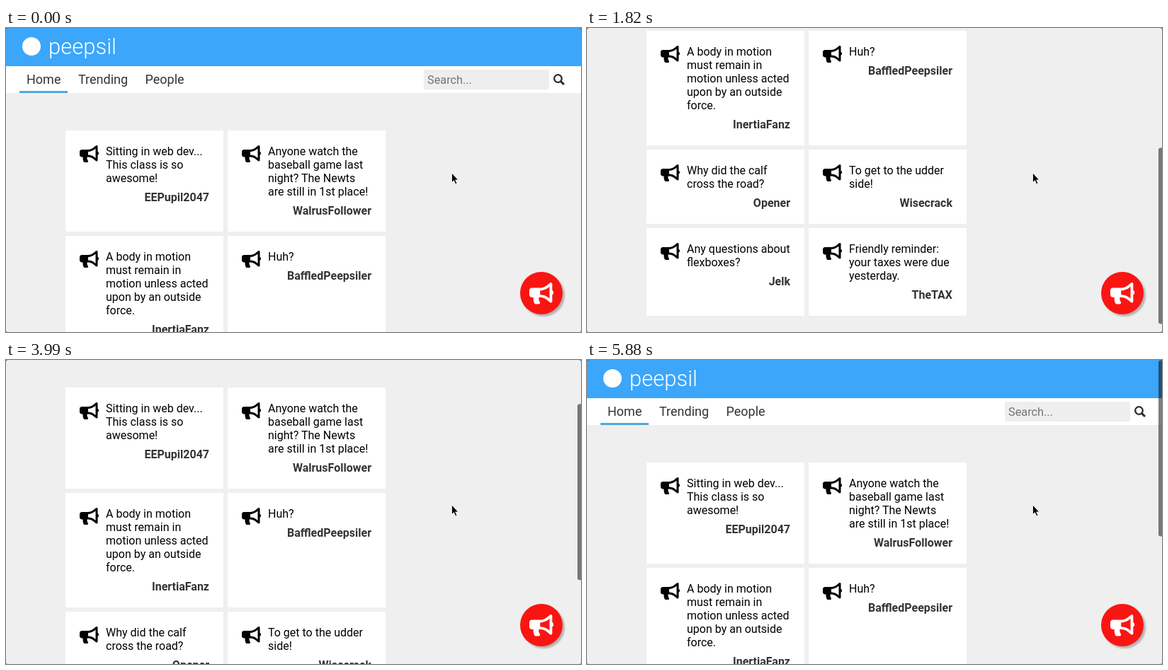
An HTML page that plays this animation: 812 px wide and 430 px high, repeating every 5950 ms.

```html
<!DOCTYPE html>
<html lang="en">
<head>
<meta charset="utf-8">
<title>Message feed</title>
<style>
  html, body { margin: 0; width: 100%; height: 100%; overflow: hidden; background: #efefef; }
  svg { display: block; width: 812px; height: 430px; font-family: Roboto, sans-serif; }
  .message { font-size: 16px; fill: #000; }
  .author { font-size: 16px; font-weight: 700; fill: #333; text-anchor: end; }
  .nav { font-size: 18px; fill: #333; }
</style>
</head>
<body>
<svg viewBox="0 0 812 430">
  <defs>
    <path id="horn" d="M576 240c0-23.6-13-44-32-55.1V32C544 23.3 537 0 512 0c-7.1 0-14.2 2.4-20 7l-85 68C364.300 109.200 310.700 128 256 128H64c-35.400 0-64 28.700-64 64v96c0 35.400 28.700 64 64 64h33.700c-1.400 10.500-2.200 21.100-2.200 32 0 39.800 9.300 77.400 25.600 111 5.200 10.700 16.500 17 28.400 17h74.300c26 0 41.700-29.800 25.900-50.600-16.400-21.500-26.200-48.300-26.200-77.400 0-11.100 1.600-21.800 4.500-32H256c54.700 0 108.300 18.800 151 53l85 68a32 32 0 0 0 20 7c24.900 0 32-22.800 32-32V295C563 284 576 263.600 576 240zm-96 141.400l-33-26.400C393 311.800 325 288 256 288v-96c69 0 137-23.800 191-67l33-26.400z"/>
    <filter id="soft" x="-20%" y="-20%" width="140%" height="140%"><feGaussianBlur stdDeviation="1"/></filter>
  </defs>
  <rect width="812" height="430" fill="#efefef"/>

  <g id="page">
    <rect width="812" height="54" fill="#3ba6fa"/>
    <circle cx="36" cy="26" r="13" fill="#fff"/>
    <text x="60" y="37" font-size="31" font-weight="300" fill="#fff">peepsil</text>
    <rect y="54" width="812" height="38" fill="#fff"/>
    <g class="nav">
      <text x="29" y="79">Home</text>
      <text x="102" y="79">Trending</text>
      <text x="196.500" y="79">People</text>
    </g>
    <rect x="19" y="89" width="68" height="3" fill="#4fa8e0"/>
    <rect x="590" y="59" width="177" height="28" rx="3" fill="#eee"/>
    <text x="595" y="79" font-size="16.300" fill="#757575">Search...</text>
    <g fill="none" stroke="#2b2b2b">
      <circle cx="779.500" cy="71.500" r="5.300" stroke-width="2.300"/>
      <path d="M783.500 75.500L788 80" stroke-width="3"/>
    </g>
    <g id="cards"></g>
  </g>

  <circle cx="759" cy="378" r="30" fill="#000" opacity=".25" filter="url(#soft)"/>
  <circle cx="756" cy="375" r="30" fill="#fa1512"/>
  <use href="#horn" fill="#fff" transform="translate(739 360) scale(.0595)"/>
  <rect id="thumb" x="807" width="8" height="249" rx="3" fill="#000" fill-opacity=".5"/>
  <path d="M629.500 205v13.500l3-2.800 2.200 5 2.200-1-2.200-4.800h4z" fill="#000" stroke="#fff" stroke-width=".8"/>
  <path d="M0 0h3q-3 0-3 3zM812 0h-3q3 0 3 3zM0 430h2q-2 0-2-2zM812 430h-2q2 0 2-2z" fill="#555"/>
</svg>
<script>
const LOOP = 5950, STEP = 70;
const LINE = 19;

const rows = [
  { top: 145, height: 143, cards: [
    ["EEPupil2047", "Sitting in web dev...", "This class is so", "awesome!"],
    ["WalrusFollower", "Anyone watch the", "baseball game last", "night? The Newts", "are still in 1st place!"]] },
  { top: 294, height: 162, cards: [
    ["InertiaFanz", "A body in motion", "must remain in", "motion unless acted", "upon by an outside", "force."],
    ["BaffledPeepsiler", "Huh?"]] },
  { top: 462, height: 105, cards: [
    ["Opener", "Why did the calf", "cross the road?"],
    ["Wisecrack", "To get to the udder", "side!"]] },
  { top: 573, height: 124, cards: [
    ["Jelk", "Any questions about", "flexboxes?"],
    ["TheTAX", "Friendly reminder:", "your taxes were due", "yesterday."]] }
];

function cardMarkup(x, top, height, [author, ...lines]) {
  const text = lines.map((line, i) =>
    `<text class="message" x="${x + 57}" y="${top + 35 + i * LINE}">${line}</text>`).join("");
  return `<rect x="${x}" y="${top}" width="223" height="${height}" fill="#fff"/>
    <use href="#horn" transform="translate(${x + 20} ${top + 21}) scale(.0469)"/>${text}
    <text class="author" x="${x + 203}" y="${top + 43 + lines.length * LINE}">${author}</text>`;
}

const byId = id => document.getElementById(id);
byId("cards").innerHTML = rows.map(({ top, height, cards }) =>
  cards.map((card, i) => cardMarkup(84 + i * 229, top, height, card)).join("")).join("");

// time, scroll offset
const keys = [[0, 0], [210, 0], [700, 68], [1260, 179], [1820, 290], [2170, 315],
  [3010, 315], [3500, 215], [4000, 104], [4410, 27], [4800, 4], [5250, 0], [LOOP, 0]];

const slope = i => (keys[i + 1][1] - keys[i][1]) / (keys[i + 1][0] - keys[i][0]);

// Harmonic mean of neighbouring slopes keeps the curve free of overshoot.
function tangent(i) {
  if (i === 0 || i === keys.length - 1) return 0;
  const a = slope(i - 1), b = slope(i);
  return a * b <= 0 ? 0 : 2 * a * b / (a + b);
}

function scrollAt(time) {
  const i = Math.max(0, keys.findIndex(key => key[0] > time) - 1);
  const [t0, y0] = keys[i], [t1, y1] = keys[i + 1];
  const span = t1 - t0, u = (time - t0) / span, v = 1 - u;
  return y0 * (1 + 2 * u) * v * v + y1 * u * u * (3 - 2 * u)
    + span * u * v * (tangent(i) * v - tangent(i + 1) * u);
}

const page = byId("page"), thumb = byId("thumb");

function draw(time) {
  const scroll = Math.round(scrollAt(time));
  page.setAttribute("transform", `translate(0 ${-scroll})`);
  thumb.setAttribute("y", 0.5 + scroll * 0.583);
  thumb.setAttribute("visibility", time < 210 ? "hidden" : "visible");
}

const start = performance.now();
function tick() {
  const time = (performance.now() - start) % LOOP;
  draw(Math.floor(time / STEP) * STEP);
  requestAnimationFrame(tick);
}
tick();
</script>
</body>
</html>
```
